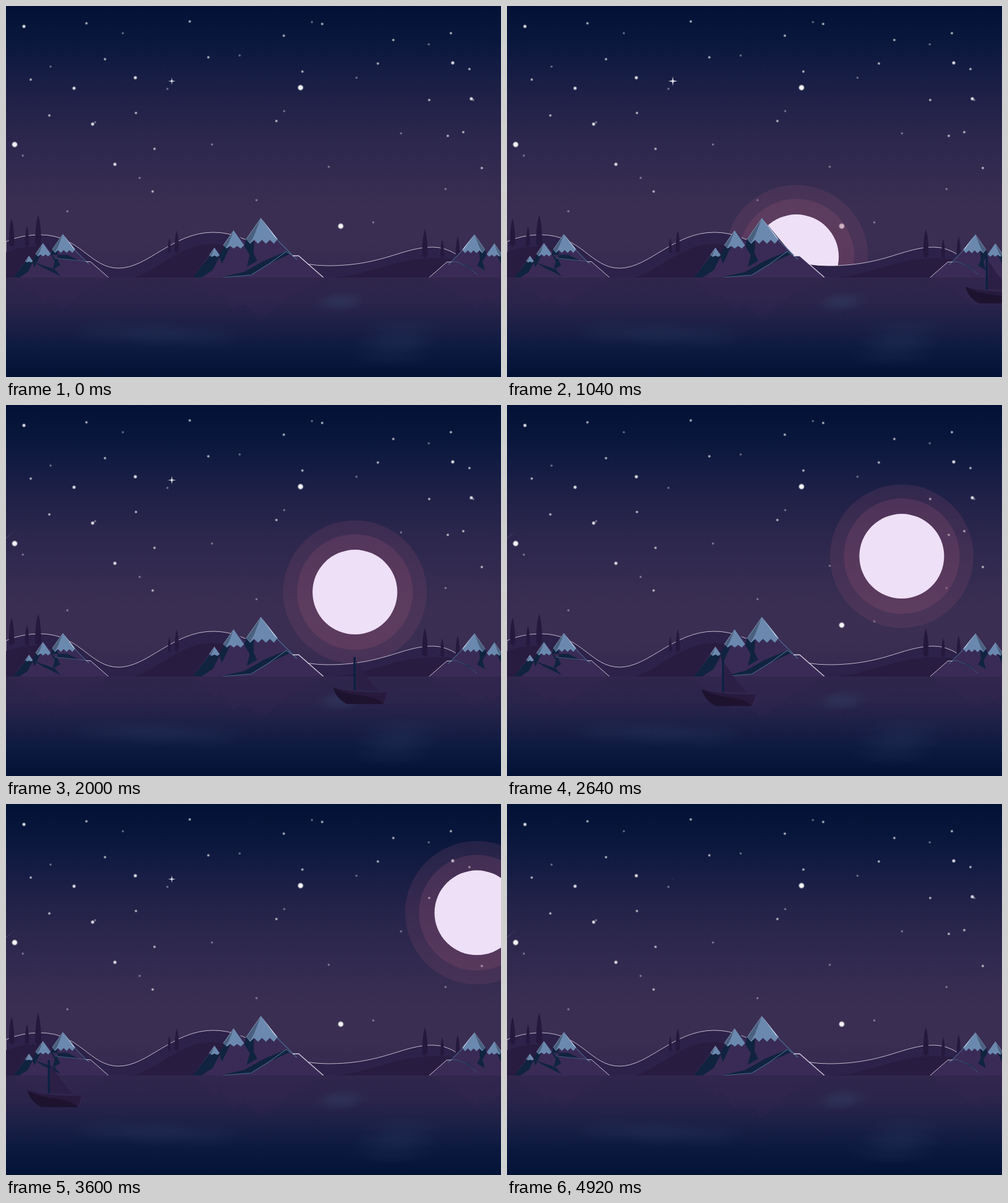
An HTML page with a canvas that plays this animation: 800 px wide and 600 px high, repeating every 4.96 s.

```html
<!DOCTYPE html>
<html lang="en">
<head>
<meta charset="utf-8">
<title>Moonrise over the lake</title>
<style>
  html, body { margin: 0; width: 100%; height: 100%; overflow: hidden; background: #031236; }
  canvas { display: block; width: 800px; height: 600px; }
</style>
</head>
<body>
<canvas id="stage" width="800" height="600"></canvas>
<script>
const ctx = document.getElementById('stage').getContext('2d');
const LOOP = 4960;
const SHORE = 439;
const DARK = '#10233f';
const EDGE = '#486487';

function vertical(y0, y1, colors) {
  const g = ctx.createLinearGradient(0, y0, 0, y1);
  colors.forEach((c, i) => g.addColorStop(i / (colors.length - 1), c));
  return g;
}

function fillPath(d, fill) {
  ctx.fillStyle = fill;
  ctx.fill(new Path2D(d));
}

function strokePath(d, color, width) {
  ctx.strokeStyle = color;
  ctx.lineWidth = width;
  ctx.stroke(new Path2D(d));
}

function disc(x, y, r, fill) {
  ctx.beginPath();
  ctx.arc(x, y, r, 0, Math.PI * 2);
  ctx.fillStyle = fill;
  ctx.fill();
}

function glow(x, y, rx, ry, rgb, alpha, core) {
  const g = ctx.createRadialGradient(0, 0, 0, 0, 0, 1);
  g.addColorStop(0, `rgba(${rgb},${alpha})`);
  g.addColorStop(core, `rgba(${rgb},${alpha * .9})`);
  g.addColorStop(1, `rgba(${rgb},0)`);
  ctx.save();
  ctx.translate(x, y);
  ctx.scale(rx, ry);
  disc(0, 0, 1, g);
  ctx.restore();
}

function eachPoint(flat, draw) {
  for (let i = 0; i < flat.length; i += 2) draw(flat[i], flat[i + 1]);
}

function bezierEase(u, a) {
  let lo = 0, hi = 1, s = .5;
  for (let i = 0; i < 24; i++) {
    s = (lo + hi) / 2;
    const x = 3 * (1 - s) ** 2 * s * a + 3 * (1 - s) * s * s * (1 - a) + s ** 3;
    if (x < u) lo = s; else hi = s;
  }
  return s * s * (3 - 2 * s);
}

function keyed(keys, t) {
  const i = Math.max(1, keys.findIndex(k => k[0] >= t));
  const [t0, v0] = keys[i - 1], [t1, v1] = keys[i];
  return v0 + (v1 - v0) * (t - t0) / (t1 - t0);
}

const bigStar = (x, y) => glow(x, y, 5.2, 5.2, '255,255,255', 1, .6);
const midStar = (x, y) => glow(x, y, 3.5, 3.5, '255,255,255', .9, .42);
const smallStar = (x, y) => glow(x, y, 2.8, 2.8, '255,255,255', .7, .33);
const faintStar = (x, y) => glow(x, y, 2.5, 2.5, '255,255,255', .42, .3);

// Most stars come in pairs, the second one lower right of the first
const paired = draw => (x, y) => {
  draw(x, y);
  draw(x + 30, y + 58);
};

function drawSky() {
  ctx.fillStyle = vertical(0, SHORE, ['#021135', '#0a173c', '#161d44', '#232249', '#2d274d',
    '#342b50', '#3a2f52', '#3a2e52', '#34294f']);
  ctx.fillRect(0, 0, 800, SHORE);
  eachPoint([476, 132, 14, 224, 541, 356], bigStar);
  eachPoint([110, 133, 722, 92], paired(midStar));
  eachPoint([209, 116, 176, 256, 29, 33], midStar);
  eachPoint([130, 28, 297, 25, 40, 119, 210, 173, 449, 48, 719, 44, 684, 152, 739, 204], paired(smallStar));
  eachPoint([237, 300, 511, 29, 437, 186, 601, 93, 626, 55], smallStar);
  for (let i = 1; i < 20; i++) faintStar(800 * (i * .618 % 1), 8 + i * 18);
}

function drawTwinkle(t) {
  const arm = keyed([[0, 6], [520, 6], [1700, 10], [2640, .7], [3900, 8], [LOOP, .7]], t);
  const w = Math.min(.9, arm * .12);
  ctx.save();
  ctx.translate(268, 121.5);
  glow(0, 0, arm * .5, arm * .5, '255,255,255', .4, .2);
  ctx.beginPath();
  for (let i = 0; i < 8; i++) {
    const r = i % 2 ? w * 1.4 : arm, a = i * Math.PI / 4;
    ctx.lineTo(r * Math.cos(a), r * Math.sin(a));
  }
  ctx.fillStyle = '#f2f0f7';
  ctx.fill();
  ctx.restore();
}

// The tail starts at (x0, y0) and slides down-left until it rests
function drawMeteor(t, start, end, x0, y0, slope) {
  if (t < start) return;
  const dx = 1.25 * (Math.min(t, end) - start), length = 105;
  const x = x0 - dx, y = y0 + dx * slope;
  const hx = x - length, hy = y + length * slope;
  const g = ctx.createLinearGradient(x, y, hx, hy);
  g.addColorStop(0, 'rgba(220,215,235,0)');
  g.addColorStop(.4, 'rgba(220,215,235,.33)');
  g.addColorStop(1, 'rgba(255,255,255,.9)');
  fillPath(`M${x} ${y}L${hx - 2} ${hy - 3}L${hx + 2} ${hy + 3}Z`, g);
}

// The moon follows a wide circle at constant speed
function drawMoon(t) {
  const a = (47.4 - (t - 1480) * .0111) * Math.PI / 180;
  const x = 1068 - 759 * Math.sin(a), y = 870 - 759 * Math.cos(a);
  disc(x, y, 116, 'rgba(142,74,112,.2)');
  disc(x, y, 93.5, 'rgba(150,82,118,.23)');
  disc(x, y, 68.5, '#eee0f7');
}

function drawTrees(ground, tips) {
  eachPoint(tips, (x, y) => {
    const h = ground - y, w = h * .095, low = y + h * .9, bulge = y + h * .3;
    fillPath(`M${x} ${y}Q${x + w} ${bulge} ${x + w} ${low}L${x} ${ground}` +
      `L${x - w} ${low}Q${x - w} ${bulge} ${x} ${y}`, '#251a3e');
  });
}

function drawHills() {
  const ridge = 'M0 439V381Q25 370 55 370C120 370 135 424 182 424S270 366 335 366' +
    'S430 420 520 420S640 390 690 390Q710 390 730 403';
  fillPath(ridge + 'L800 430V439Z', '#2d2249');
  strokePath(ridge, 'rgba(240,235,248,.75)', 1);
  fillPath('M0 398Q50 380 90 398L130 439H0Z', '#281c40');
  fillPath('M207 439C250 425 285 384 335 385S410 439 440 439Z', '#281c40');
  fillPath('M533 439C590 434 630 408 690 408S740 420 760 439Z', '#281c40');
  drawTrees(390, [9, 344, 34, 356, 52, 338]);
  drawTrees(400, [264, 375, 276, 363]);
  drawTrees(408, [677, 361, 705, 377, 730, 373]);
}

// Snow cap with a saw-tooth hem
function drawCap(x, y, h, rightRun, teeth) {
  const left = x - .7 * h, width = (.7 + rightRun) * h, bottom = y + h;
  let hem = '';
  for (let i = 1; i < teeth * 2; i++) {
    hem += `L${left + width * i / (teeth * 2)} ${bottom + h * (i % 2 ? .22 : .04)}`;
  }
  const apex = `M${x} ${y}L${left} ${bottom}`;
  fillPath(`${apex}${hem}L${left + width} ${bottom}Z`, '#6b89af');
  fillPath(`${apex}L${left + width * .13} ${bottom + h * .17}L${x - h * .33} ${y + h * .85}Z`, '#4a607f');
  strokePath(apex, 'rgba(205,218,235,.5)', .8);
}

// Mountain coordinates are relative to the highest peak
const SILHOUETTE = 'M-110 96L-75 48L-66 61L-44 20L-27 38L0 0L51 61H61L101 96Z';
const GULLIES = 'M-110 96L-82 60L-67 63L-78 84L-96 96ZM-59 45L-68 60L-63 74L-50 46Z' +
  'M-23 31L-27 45L-18 60L-23 79L-6 69L-12 57L-11 38Z';

const MOUNTAINS = [
  { x: 92, y: 369, sx: .73, sy: .73,
    ridge: 'M-24 46H10L36 59L-18 53ZM-64 62L-18 78L-5 93L-44 74Z', seam: 'M-18 53L52 60' },
  { x: 412, y: 343, sx: 1, sy: 1,
    ridge: 'M43 53L5 69L-27 87L-65 96L-16 92L13 74L47 58Z', seam: 'M-62 96L-16 92L13 74L41 54L50 60' },
  { x: 757, y: 369.5, sx: -.73, sy: .73,
    ridge: 'M40 60L12 70L-4 86L10 75Z', seam: 'M52 61L40 60L12 72L-6 89' }
];

function drawMountain({ x, y, sx, sy, ridge, seam }) {
  ctx.save();
  ctx.translate(x, y);
  ctx.scale(sx, sy);
  fillPath(SILHOUETTE, '#392b56');
  fillPath(GULLIES + ridge, DARK);
  strokePath(seam, EDGE, 1.1);
  strokePath('M27 36L58 67', EDGE, 1.4);
  strokePath('M51 61H61L101 96', 'rgba(238,233,245,.85)', 1.3);
  drawCap(-75, 48, 12, .7, 2);
  drawCap(-44, 20, 24, .7, 3);
  drawCap(0, 0, 34, .8, 4);
  fillPath('M0 0L28 36L22 30Z', '#f1eff8');
  ctx.restore();
}

function drawMist(x, y, rx, ry, dx, dy) {
  for (let i = -1; i <= 1; i++) glow(x + i * dx, y + i * dy, rx, ry, '50,68,104', i ? .15 : .24, .3);
}

function drawWater() {
  ctx.fillStyle = vertical(SHORE, 600, ['#30264b', '#2b244b', '#1b1f46', '#0b193f', '#021235']);
  ctx.fillRect(0, SHORE, 800, 161);
  for (const { x, y, sx, sy } of MOUNTAINS) {
    ctx.save();
    ctx.translate(x, SHORE + (SHORE - y) * .72);
    ctx.scale(sx, -sy * .72);
    fillPath(SILHOUETTE, 'rgba(66,46,92,.12)');
    ctx.restore();
  }
  drawMist(245, 531, 66, 22, 75, 3);
  drawMist(633, 544, 72, 18, -10, 21);
  drawMist(541, 478, 38, 16, 11, -4);
}

function drawBoat(t) {
  const x = 804 - 908 * bezierEase((t - 40) / 5000, .477);
  ctx.save();
  ctx.translate(x, 453 + (791 - x) * .0135);
  fillPath('M37 -42Q55 -12 74 6L36 4Z', '#2c1f46');
  ctx.fillStyle = '#0d2142';
  ctx.fillRect(32.5, -49, 3.5, 54);
  fillPath('M0 0Q24 9 87 9Q87 18 81 27H22Q4 18 0 0Z', '#271a3d');
  fillPath('M0 0Q14 10 45 13Q70 16 81 27H22Q4 18 0 0Z', '#1d132f');
  strokePath('M87 10Q87 18 81.5 26', '#3b2b56', 1);
  ctx.restore();
}

function render(t) {
  drawSky();
  drawTwinkle(t);
  if (t < 570) drawMeteor(t, 120, 570, 545, -65, .72);
  drawMeteor(t, 1740, 1998, 343, -76, .85);
  drawMoon(t);
  drawHills();
  MOUNTAINS.forEach(drawMountain);
  drawWater();
  drawBoat(t);
}

const began = performance.now();
function tick() {
  render((performance.now() - began) % LOOP);
  requestAnimationFrame(tick);
}
tick();
</script>
</body>
</html>
```
